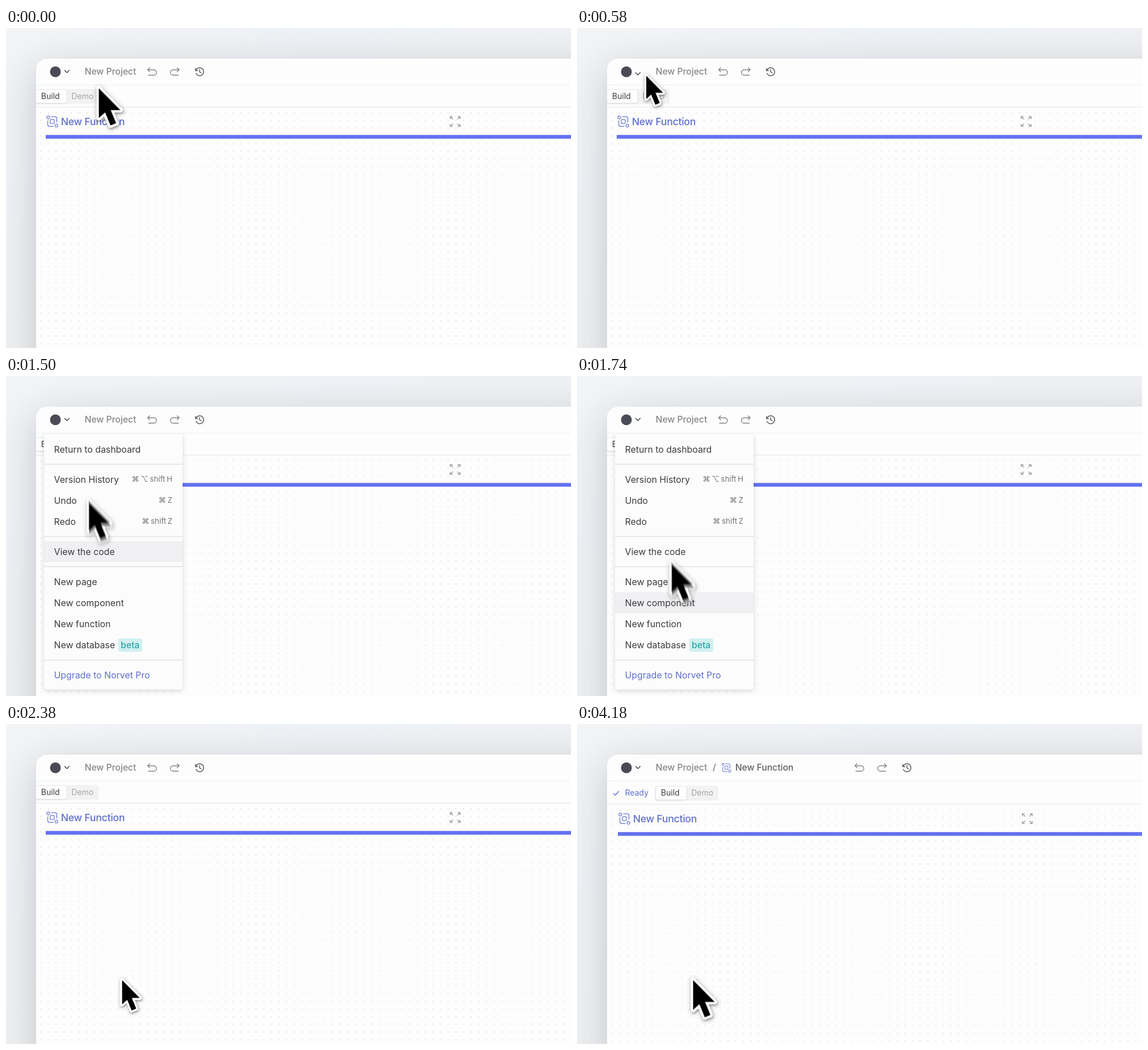
An HTML page with a canvas for the animation above (4.26 s loop, 995 by 563 pixels).

```html
<!DOCTYPE html>
<html lang="en">
<head>
<meta charset="utf-8">
<title>New function menu</title>
<style>
html, body { margin: 0; width: 100%; height: 100%; overflow: hidden; background: #eceff2; }
canvas { display: block; }
</style>
</head>
<body>
<canvas id="stage" width="995" height="563"></canvas>
<script>
const W = 995, H = 563, LOOP = 4260;
const ctx = document.getElementById('stage').getContext('2d');
const FONT = 'Inter, "DejaVu Sans", sans-serif';
const BLUE = '#606fd0';

const MENU_OPEN = 640, MENU_CLOSE = 2280, PAGE_READY = 2420;
const ROWS = [
  [129, 'Return to dashboard'],
  [182, 'Version History', '⌘ ⌥ shift H'],
  [219, 'Undo', '⌘ Z'],
  [256, 'Redo', '⌘ shift Z'],
  [309, 'View the code'],
  [362, 'New page'],
  [399, 'New component'],
  [436.5, 'New function'],
  [473.5, 'New database'],
  [526.5, 'Upgrade to Norvet Pro']
];

const clamp = v => Math.min(1, Math.max(0, v));
const lerp = (a, b, k) => a + (b - a) * k;
const ease = (t, a, b) => {
  const u = clamp((t - a) / (b - a));
  return u * u * (3 - 2 * u);
};

function text(c, str, x, y, size, color, weight = 400, spacing = 0) {
  c.font = `${weight} ${size}px ${FONT}`;
  c.letterSpacing = spacing + 'px';
  c.fillStyle = color;
  c.fillText(str, x, y);
}

function box(c, x, y, w, h, r, color) {
  c.fillStyle = color;
  c.beginPath();
  c.roundRect(x, y, w, h, r);
  c.fill();
}

function shadow(c, color, blur = 0, dy = 0, dx = 0) {
  c.shadowColor = color;
  c.shadowBlur = blur;
  c.shadowOffsetX = dx;
  c.shadowOffsetY = dy;
}
const noShadow = c => shadow(c, 'transparent');

// Strokes an SVG path in a local coordinate system.
function icon(c, d, x, y, color, width = 1.5, sx = 1, sy = sx) {
  c.save();
  c.translate(x, y);
  c.scale(sx, sy);
  c.strokeStyle = color;
  c.lineWidth = width;
  c.lineCap = c.lineJoin = 'round';
  c.stroke(new Path2D(d));
  c.restore();
}

const CHEVRON = 'M-4 -2L0 2L4 -2';
const UNDO = 'M-4 -7L-7.5 -3.5L-4 0M-7.5 -3.5H3.3A4.7 4.7 0 0 1 3.3 6H-6';
const HISTORY = 'M-6.6 -2.4A7 7 0 1 1 -6.4 2.8M-7.3 -5.8V-2H-3.5M0 -3.8V0.3L2.8 1.8';
const CHECK = 'M-4.5 0.3L-1.7 3.3L4.5 -3.5';
const FUNC = 'M-2 -3.5H2A1.5 1.5 0 0 1 3.5 -2V2A1.5 1.5 0 0 1 2 3.5H-2A1.5 1.5 0 0 1 -3.5 2V-2A1.5 1.5 0 0 1 -2 -3.5Z' +
  'M-9.7 -7.2a2.5 2.5 0 1 0 5 0a2.5 2.5 0 1 0 -5 0M4.7 7.2a2.5 2.5 0 1 0 5 0a2.5 2.5 0 1 0 -5 0' +
  'M-1.5 -8.5H5A3 3 0 0 1 8 -5.5V1M1.5 8.5H-5A3 3 0 0 1 -8 5.5V-1';
const EXPAND = 'M4.2 -4.2L8.5 -8.5M4.8 -8.7H8.7V-4.8';

function drawBackdrop(c) {
  const g = c.createLinearGradient(0, 0, 260, 563);
  g.addColorStop(0, '#f2f4f6');
  g.addColorStop(0.4, '#eef1f5');
  g.addColorStop(1, '#eeeff1');
  c.fillStyle = g;
  c.fillRect(0, 0, W, H);
  shadow(c, 'rgba(40,40,42,0.22)', 64, 16);
  box(c, 53, 54, 1100, 700, 19, '#fdfdfd');
  noShadow(c);
}

function drawHeader(c, open) {
  const dx = open ? 240 : 0;
  c.fillStyle = '#4b4b57';
  c.beginPath();
  c.arc(87, 77, 9.5, 0, 7);
  c.fill();
  text(c, 'New Project', 138.6, 82, 15.65, '#87878b', 500);
  if (open) {
    text(c, '/', 239, 82, 15.65, '#7c7c80', 500);
    icon(c, FUNC, 263, 77, '#8490dc', 1.6, 0.8);
    text(c, 'New Function', 278.7, 82, 15.65, '#606065', 500);
  }
  icon(c, UNDO, 257 + dx, 77, '#828286', 1.4);
  icon(c, UNDO, 297.5 + dx, 77, '#828286', 1.4, -1, 1);
  icon(c, HISTORY, 341 + dx, 77, '#5c5c60', 1.5);
  c.fillStyle = '#efeff0';
  c.fillRect(53, 100, W, 1);
}

function drawTabs(c, open) {
  const dx = open ? 86 : 0, dy = open ? 1 : 0;
  c.save();
  c.beginPath();
  c.rect(53, 101, W, 38);
  c.clip();
  box(c, 51 + dx, 107.5 + dy, 112, 26, 4, '#f2f2f3');
  shadow(c, 'rgba(0,0,0,0.13)', 3, 1);
  box(c, 53 + dx, 109 + dy, 53.5, 23, 3, '#fefefe');
  noShadow(c);
  text(c, 'Build', 61.8 + dx, 125 + dy, 14, '#3f3f43');
  text(c, 'Demo', 115.2 + dx, 125 + dy, 14, '#a4a4a7');
  if (open) {
    icon(c, CHECK, 69, 122, BLUE, 1.4);
    text(c, 'Ready', 84.4, 126, 14, BLUE);
  }
  c.restore();
}

function drawCanvasArea(c, open) {
  const o = open ? 2 : 0, step = 13.54;
  c.fillStyle = '#e9e9ea';
  c.fillRect(53, 138.5 + o, W, 1.2);
  c.fillStyle = '#d3d3d8';
  for (let y = 149.3 + o; y < H; y += step) {
    for (let x = 61.2 + o * 0.8; x < W; x += step) c.fillRect(x - 0.7, y - 0.7, 1.4, 1.4);
  }
  icon(c, FUNC, 81.5 + o, 164.5 + o, '#7c88d6', 1.5);
  text(c, 'New Function', 96.7 + o, 171 + o, 17.6, BLUE, 500, -0.25);
  for (const [sx, sy] of [[1, 1], [-1, 1], [1, -1], [-1, -1]]) {
    icon(c, EXPAND, 791 + o, 164.5 + o, '#98989c', 1.3, sx, sy);
  }
  c.fillStyle = '#6370f0';
  c.fillRect(70 + o, 188.2 + o, W, 6.5);
}

function layer(paint) {
  const cv = document.createElement('canvas');
  cv.width = W;
  cv.height = H;
  paint(cv.getContext('2d'));
  return cv;
}

const page = open => layer(c => {
  drawBackdrop(c);
  drawHeader(c, open);
  drawTabs(c, open);
  drawCanvasArea(c, open);
});

function drawMenu(hoverY) {
  ctx.save();
  ctx.beginPath();
  ctx.rect(0, 101, W, H);
  ctx.clip();
  shadow(ctx, 'rgba(0,0,0,0.16)', 9, 2);
  box(ctx, 67, 102, 244, 449.5, 4, '#fcfcfc');
  noShadow(ctx);
  ctx.fillStyle = '#e6e6e8';
  for (const y of [154.5, 281.5, 334.5, 499]) ctx.fillRect(67, y, 244, 1.8);

  for (const [y, label, keys] of ROWS) {
    if (Math.abs(hoverY - y) <= 18.5) {
      ctx.fillStyle = '#f0f0f2';
      ctx.fillRect(67, y - 18.5, 244, 37);
    }
    const last = label.startsWith('Upgrade');
    text(ctx, label, 84.5, y + 5.7, 15.85, last ? BLUE : '#3d3d41');
    if (keys) {
      ctx.textAlign = 'right';
      ctx.wordSpacing = '-1.2px';
      text(ctx, keys, 293, y + 3.8, 13.4, '#77777b');
      ctx.wordSpacing = '0px';
      ctx.textAlign = 'left';
    }
  }
  box(ctx, 197.5, 461.8, 42.5, 23.5, 4, '#cff1f0');
  text(ctx, 'beta', 202, 479.2, 15.7, '#2ba6a6', 500);
  ctx.restore();
}

const PAD = 16;
const arrow = layer(c => {
  const p = new Path2D('M0 0V52.5L11 42.5L20.5 65.5L30.5 61.5L21 38.5H38Z');
  c.translate(PAD, PAD);
  c.lineJoin = 'round';
  c.lineWidth = 8.6;
  c.strokeStyle = '#fff';
  shadow(c, 'rgba(0,0,0,0.5)', 5, 2, 1);
  c.stroke(p);
  noShadow(c);
  c.fill(p);
});
const blurLayer = document.createElement('canvas');
blurLayer.width = W;
blurLayer.height = H;
const blurCtx = blurLayer.getContext('2d');

function pointer(t) {
  if (t < 1000) {
    const k = ease(t, 0, 500);
    return [lerp(163.5, 122, k), lerp(106, 84, k)];
  }
  return [
    lerp(122, 204.5, ease(t, 1000, 2400)),
    lerp(84, 450.5, ease(t, 1000, 2200))
  ];
}

function pressScale(t) {
  const press = (a, b, c, d) => ease(t, a, b) - ease(t, c, d);
  return 1 - 0.22 * (press(400, 560, 600, 1200) + press(2060, 2220, 2260, 2720));
}

// Averages several positions across the shutter time for motion blur.
function drawPointer(t) {
  const n = 8, shutter = 20, s = pressScale(t);
  const size = 110;
  blurCtx.clearRect(0, 0, W, H);
  blurCtx.globalCompositeOperation = 'lighter';
  blurCtx.globalAlpha = 1 / n;
  for (let i = 0; i < n; i++) {
    const [x, y] = pointer(Math.max(0, t + (i / (n - 1) - 0.5) * shutter));
    blurCtx.drawImage(arrow, 0, 0, size, size, x - PAD * s, y - PAD * s, size * s, size * s);
  }
  ctx.drawImage(blurLayer, 0, 0);
}

const before = page(false), after = page(true);

function draw(t) {
  ctx.drawImage(t < PAGE_READY ? before : after, 0, 0);
  const dip = 4 * (ease(t, 260, 420) - ease(t, 880, 1030));
  icon(ctx, CHEVRON, 107.3, 76.5 + dip, '#48484d', 1.5);
  if (t >= MENU_OPEN && t < MENU_CLOSE) {
    // The hover runs ahead of the smoothed pointer.
    drawMenu(t < 1050 ? 0 : pointer(t + 210)[1]);
  }
  drawPointer(t);
}

const start = performance.now();
function frame() {
  draw((performance.now() - start) % LOOP);
  requestAnimationFrame(frame);
}
frame();
</script>
</body>
</html>
```
